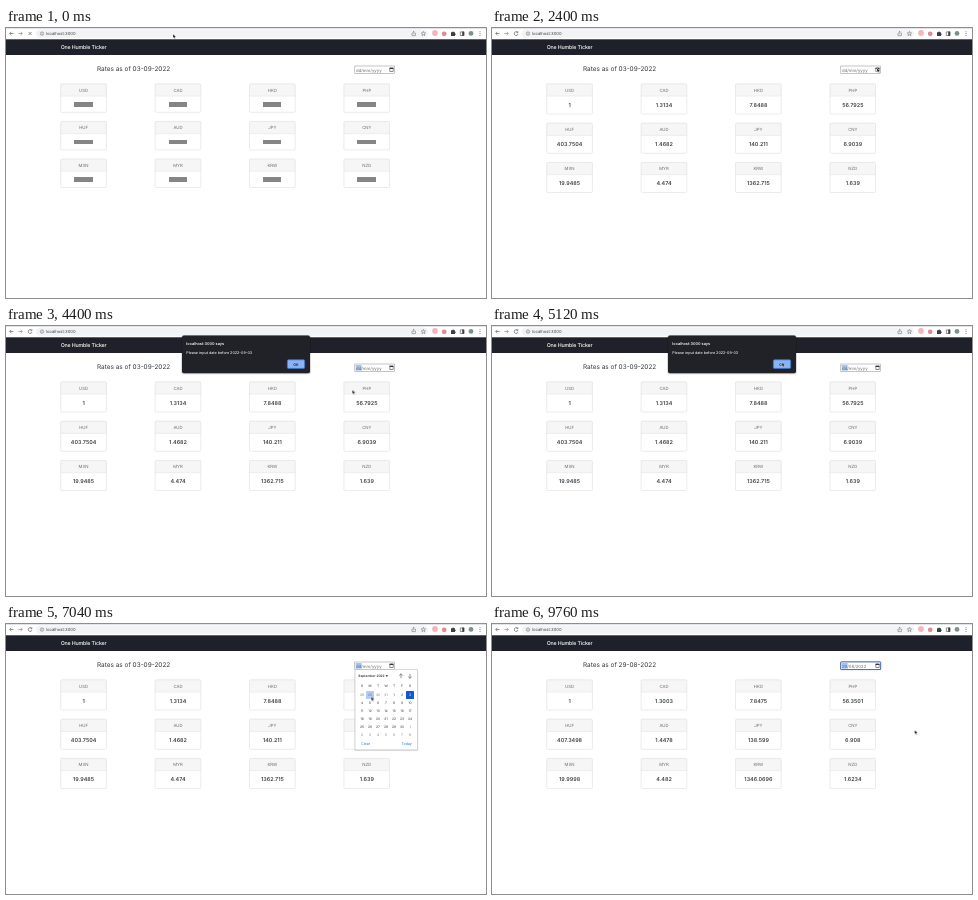
An HTML page for the animation above (9920 ms loop, 480x270 px).

```html
<!DOCTYPE html>
<html lang="en">
<head>
<meta charset="utf-8">
<title>Exchange rates</title>
<style>
  html, body { margin: 0; width: 100%; height: 100%; overflow: hidden; background: #fff; }
  #stage { position: absolute; left: 0; top: 0; width: 480px; height: 270px; overflow: hidden; }
  svg { position: absolute; left: 0; top: 0; }
  text { font-family: Inter, "Liberation Sans", sans-serif; text-rendering: geometricPrecision; }
  .mid { text-anchor: middle; }
  .code { font-size: 4.3px; fill: #6a6d70; }
  .rate { font-size: 5.4px; font-weight: 600; fill: #3c4043; }
  .title { font-size: 6.45px; fill: #33373b; }
  .field { font-size: 4.3px; fill: #6b6b6b; }
  .day { font-size: 3.3px; fill: #333; }
  .dim { fill: #777; }
  .link { font-size: 3.6px; fill: #1a73e8; }
  .icon { fill: none; stroke: #5f6368; stroke-width: .7; }

  .bar {
    position: absolute; width: 18.4px; height: 4.5px; background: #858585;
    -webkit-mask: linear-gradient(130deg, #000 55%, rgba(0,0,0,.75) 75%, #000 95%) 0 0 / 200% 100%;
    mask: linear-gradient(130deg, #000 55%, rgba(0,0,0,.75) 75%, #000 95%) 0 0 / 200% 100%;
    animation: wave 9920ms linear infinite;
  }
  @keyframes wave {
    0%, 74.19% { -webkit-mask-position: 0 0; mask-position: 0 0; }
    20.16%, 94.35%, 100% { -webkit-mask-position: -200% 0; mask-position: -200% 0; }
  }

  .step { animation: 9920ms step-end infinite; }
  .stop { animation-name: stop; }
  .reload { animation-name: reload; }
  .loading { animation-name: loading; }
  .first { animation-name: first; }
  .second { animation-name: second; }
  .old { animation-name: old; }
  .new { animation-name: new; }
  .blank { animation-name: blank; }
  .filled { animation-name: filled; }
  .mark { animation-name: mark; }
  .ring { animation-name: ring; }
  .calendar { animation-name: calendar; }
  .hover1 { animation-name: hover1; }
  .hover2 { animation-name: hover2; }
  .alert { animation-name: alert; }
  @keyframes stop { 0% { opacity: 1 } 7.25%, 100% { opacity: 0 } }
  @keyframes reload { 0% { opacity: 0 } 7.25%, 100% { opacity: 1 } }
  @keyframes loading { 0%, 74.19% { opacity: 1 } 11.29%, 84.67%, 100% { opacity: 0 } }
  @keyframes first { 0%, 74.19%, 100% { opacity: 0 } 11.29% { opacity: 1 } }
  @keyframes second { 0% { opacity: 0 } 84.67%, 100% { opacity: 1 } }
  @keyframes old { 0% { opacity: 1 } 74.19%, 100% { opacity: 0 } }
  @keyframes new { 0% { opacity: 0 } 74.19%, 100% { opacity: 1 } }
  @keyframes blank { 0% { opacity: 1 } 71.77%, 100% { opacity: 0 } }
  @keyframes filled { 0% { opacity: 0 } 71.77%, 100% { opacity: 1 } }
  @keyframes mark { 0% { opacity: 0 } 25%, 100% { opacity: 1 } }
  @keyframes ring { 0%, 64.51% { opacity: 0 } 54.03%, 71.77%, 100% { opacity: 1 } }
  @keyframes calendar { 0%, 40.32%, 71.77%, 100% { opacity: 0 } 25%, 64.51% { opacity: 1 } }
  @keyframes hover1 { 0%, 40.32%, 100% { opacity: 0 } 34.67% { opacity: 1 } }
  @keyframes hover2 { 0%, 71.77%, 100% { opacity: 0 } 66.93% { opacity: 1 } }
  @keyframes alert { 0%, 54.03%, 100% { opacity: 0 } 41.13% { opacity: 1 } }

  #cursor { width: 6px; height: 7px; overflow: visible; animation: move 9920ms ease-in-out infinite; }
  @keyframes move {
    0% { transform: translate(167px, 6px) }
    10.5%, 15.3% { transform: translate(89.5px, 11px) }
    24.2%, 26.6% { transform: translate(385px, 40px) }
    34.7%, 40.3% { transform: translate(388px, 84px) }
    49.2%, 52.4% { transform: translate(290px, 36.5px) }
    59.7%, 64.5% { transform: translate(385px, 40px) }
    67% { transform: translate(365px, 72px) }
    79% { transform: translate(366px, 74.5px) }
    82.3%, 100% { transform: translate(422.6px, 106px) }
  }
</style>
</head>
<body>
<div id="stage">
  <svg id="page" width="480" height="270" viewBox="0 0 480 270">
    <rect width="480" height=".8" fill="#dadde1"/>
    <rect x="30" y="1.4" width="392" height="8.4" rx="4.2" fill="#f1f3f4"/>
    <g class="icon">
      <path d="M7.5 5.5H3.8M5.4 3.8L3.7 5.5L5.4 7.2"/>
      <path d="M12.5 5.5H16.2M14.6 3.8L16.3 5.5L14.6 7.2" stroke="#888"/>
      <path class="step stop" d="M22.6 4L25.6 7M25.6 4L22.6 7"/>
      <path class="step reload" d="M25.6 4.3A1.9 1.9 0 1 0 26 6M25.9 3.2V4.7H24.4"/>
      <circle cx="36" cy="5.6" r="1.7" stroke-width=".5"/>
      <path d="M36 5.3V6.6M36 4.4V4.8" stroke-width=".5"/>
      <path d="M406.6 5H406V7.6H409.4V5H408.8M407.7 6.2V3.3M406.8 4.2L407.7 3.3L408.6 4.2" stroke-width=".5"/>
      <path d="M417.4 3.4L418 4.9L419.6 5L418.4 6L418.8 7.6L417.4 6.7L416 7.6L416.4 6L415.2 5L416.8 4.9Z" stroke-width=".5"/>
    </g>
    <circle cx="429" cy="5" r="2.9" fill="#f5b5bb"/>
    <circle cx="438.2" cy="5.8" r="2.4" fill="#e08a96"/>
    <path d="M445 4.3H446.3A.8.8 0 0 1 447.9 4.3H449V5.4A.8.8 0 0 1 449 7V8H445Z" fill="#3c4043"/>
    <path d="M454.3 3.9H457.9V7.5H454.3Z" class="icon"/>
    <path d="M456.2 3.6H458.2V7.8H456.2Z" fill="#3c4043"/>
    <circle cx="465" cy="5.4" r="2.4" fill="#7f9088"/>
    <path d="M474 3.4v.8M474 5.2v.8M474 7v.8" stroke="#3c4043" stroke-width=".8"/>
    <text x="40" y="7.2" font-size="4.2" fill="#3c4043">localhost:3000</text>

    <rect y="11.3" width="480" height="15.7" fill="#1e2129"/>
    <text x="54.7" y="21.3" font-size="5.3" font-weight="500" letter-spacing="-.17" fill="#fff">One Humble Ticker</text>

    <text class="title step old" x="91" y="43">Rates as of 03-09-2022</text>
    <text class="title step new" x="91" y="43">Rates as of 29-08-2022</text>

    <rect x="348.8" y="38" width="39.8" height="7.6" fill="#fff" stroke="#8a8a8a" stroke-width=".5"/>
    <rect class="step ring" x="348.7" y="37.9" width="40" height="7.7" rx=".6" fill="#fff" stroke="#2f55b5" stroke-width=".9"/>
    <rect class="step mark" x="349.7" y="39" width="5.9" height="5.6" fill="#a3c4f3"/>
    <text class="field step blank" x="350" y="43.5">dd/mm/yyyy</text>
    <text class="field step filled" x="350" y="43.5">29/08/2022</text>
    <path d="M383.8 40.2H387.2V43.5H383.8Z" class="icon" stroke-width=".5"/>
    <path d="M383.6 39.7H387.4V41H383.6Z" fill="#333"/>

    <g id="grids"></g>

    <g id="calendar" class="step calendar">
      <rect x="348.6" y="46" width="63.6" height="81" rx="1" fill="#000" opacity=".13"/>
      <rect x="349" y="45.7" width="62.4" height="80.2" fill="#fff" stroke="#b5b5b5" stroke-width=".5"/>
      <text x="352.3" y="53.2" font-size="3.25" font-weight="600" fill="#333">September 2022</text>
      <path d="M379.5 51.3H382.1L380.8 52.9Z" fill="#333"/>
      <path class="icon" d="M395 54.3V49.8M393.2 51.6L395 49.8L396.8 51.6M404 49.8V54.3M402.2 52.5L404 54.3L405.8 52.5"/>
      <rect x="400" y="67" width="8" height="8" rx=".6" fill="#1258d6"/>
      <rect class="step hover1" x="384" y="83" width="8" height="8" rx=".6" fill="#b3ccf2"/>
      <rect class="step hover2" x="360" y="67" width="8" height="8" rx=".6" fill="#b3ccf2"/>
      <text class="link" x="355" y="121.2">Clear</text>
      <text class="link" x="395.5" y="121.2">Today</text>
    </g>

    <g class="step alert">
      <rect x="175.2" y="9" width="129.6" height="39.3" rx="2.6" fill="#000" opacity=".18"/>
      <rect x="176" y="9.6" width="128" height="37.6" rx="2" fill="#202227"/>
      <text x="180.3" y="19" font-size="3.85" font-weight="600" fill="#f1f3f4">localhost:3000 says</text>
      <text x="180.3" y="27.6" font-size="3.7" font-weight="500" fill="#e8eaed">Please input date before 2022-09-03</text>
      <rect x="281.3" y="33.8" width="17.4" height="8.6" rx="1.2" fill="#8ab4f8" stroke="#3f6fc9" stroke-width=".8"/>
      <text class="mid" x="290" y="39.5" font-size="3.7" font-weight="600" fill="#202227">OK</text>
    </g>
  </svg>
  <div id="bars" class="step loading"></div>
  <svg id="cursor" viewBox="0 0 6 7">
    <path d="M0 0V4.2L1 3.3L1.7 4.8L2.5 4.4L1.8 3H3.1Z" fill="#111" stroke="#fff" stroke-width=".4"/>
  </svg>
</div>
<script>
  const $ = id => document.getElementById(id);
  const codes = 'USD CAD HKD PHP HUF AUD JPY CNY MXN MYR KRW NZD'.split(' ');
  const rates = {
    first: '1 1.3134 7.8488 56.7925 403.7504 1.4682 140.211 6.9039 19.9485 4.474 1362.715 1.639',
    second: '1 1.3003 7.8475 56.3501 407.3498 1.4478 138.599 6.908 19.9998 4.482 1346.0696 1.6234'
  };
  const label = (cls, x, y, str) => `<text class="mid ${cls}" x="${x}" y="${y}">${str}</text>`;

  function card(i, pitch, height, rate) {
    const x = 54.7 + i % 4 * 94.4, y = 55.8 + Math.floor(i / 4) * pitch;
    return `<rect x="${x}" y="${y}" width="45.7" height="${height}" rx="1.2" fill="#fff"/>
      <path d="M${x} ${y + 12.3}V${y + 1.2}q0-1.2 1.2-1.2h43.3q1.2 0 1.2 1.2v11.1z" fill="#f6f6f6"/>
      <path d="M${x} ${y + 12.3}h45.7" stroke="#dcdcdc" stroke-width=".4"/>
      <rect x="${x}" y="${y}" width="45.7" height="${height}" rx="1.2" fill="none" stroke="#d6d6d6" stroke-width=".5"/>`
      + label('code', x + 22.9, y + 7.9, codes[i])
      + (rate ? label('rate', x + 22.9, y + 23, rate) : '');
  }

  const grid = (cls, draw) => `<g class="step ${cls}">${codes.map((_, i) => draw(i)).join('')}</g>`;
  const loaded = cls => {
    const list = rates[cls].split(' ');
    return grid(cls, i => card(i, 39.3, 30.2, list[i]));
  };
  $('grids').innerHTML = grid('loading', i => card(i, 37.6, 28.5)) + loaded('first') + loaded('second');

  $('bars').innerHTML = codes.map((_, i) =>
    `<div class="bar" style="left:${68.2 + i % 4 * 94.4}px;top:${74.2 + Math.floor(i / 4) * 37.6}px"></div>`).join('');

  let days = '';
  for (let i = 0; i < 49; i++) {
    const n = i - 10, inMonth = n > 0 && n <= 30;
    const str = i < 7 ? 'SMTWTFS'[i] : n < 1 ? n + 31 : inMonth ? n : n - 30;
    const cls = i < 7 || inMonth ? 'day' : 'day dim';
    const x = 356 + i % 7 * 8, y = 63.3 + Math.floor(i / 7) * 8 + (i < 7 ? 0 : .9);
    days += n === 3 ? `<g fill="#fff"><text class="mid" font-size="3.3" x="${x}" y="${y}">3</text></g>` : label(cls, x, y, str);
  }
  $('calendar').insertAdjacentHTML('beforeend', days);
</script>
</body>
</html>
```
